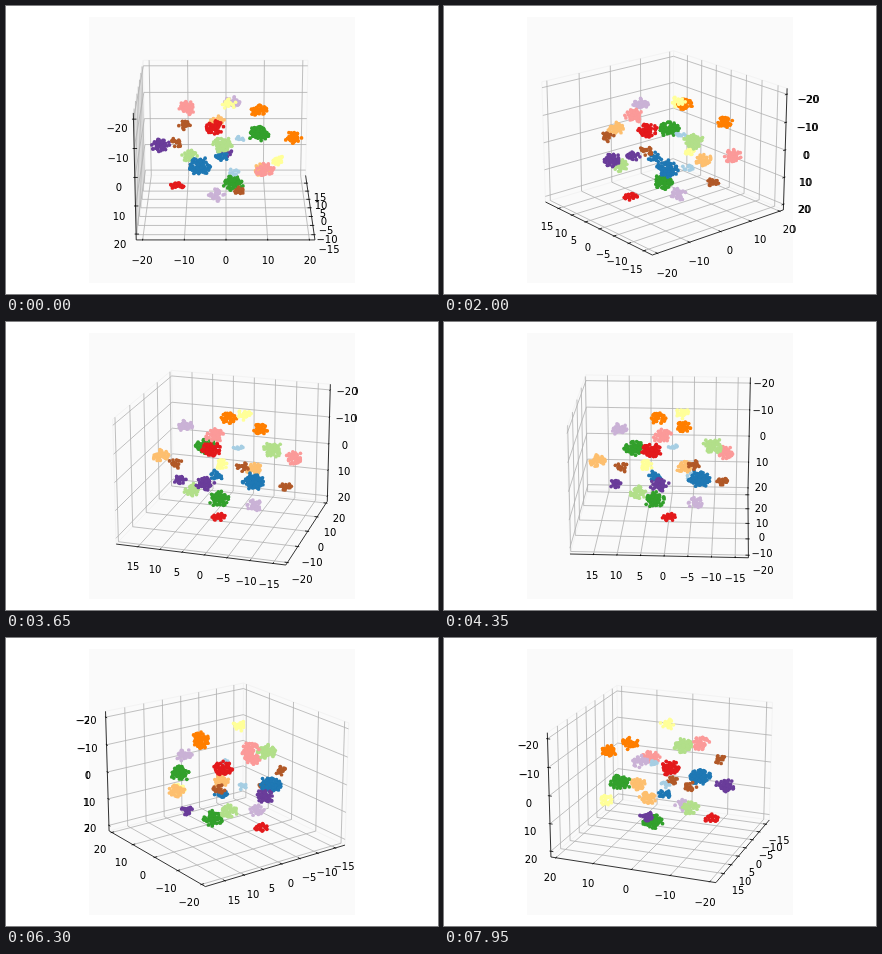
Write an HTML page with a canvas that moves like this. It is 432x288 px and loops after 8 s.

```html
<!DOCTYPE html>
<html lang="en">
<head>
<meta charset="utf-8">
<title>Rotating 3D scatter plot</title>
<style>
  html, body { margin: 0; width: 100%; height: 100%; overflow: hidden; background: #fff; }
  canvas { display: block; }
</style>
</head>
<body>
<canvas id="stage" width="432" height="288"></canvas>
<script>
const ctx = document.getElementById('stage').getContext('2d');

const STEP_MS = 50, STEPS = 160, START_AZIM = -90;
const RAD = Math.PI / 180, ELEV = 20 * RAD;
const CENTER = { x: 219.6, y: 140.4 };
const CAMERA = 1440;
const HALF = 85.72, HALF_Z = HALF * 0.75;   // half sizes of the box
const PAD = 14.2, PAD_Z = PAD * 0.75;       // label distance from the box
const TICK_OUT = 1.4, TICK_IN = 2.8;
const PANEL = [83, 11, 266, 266];

const toX = v => 4 * v + 0.4;
const toY = v => 4.54 * v - 5;
const toZ = v => -2.909 * v;

const ticks = (limit, step) =>
  Array.from({ length: 2 * limit / step + 1 }, (_, i) => i * step - limit);
const TENS = ticks(20, 10), FIVES = ticks(15, 5);

// Colour, points per cluster, then the cluster centres
const CLUSTERS = [
  ['#a6cee3', 10, [15, -9, 11], [8, -28, -16]],
  ['#1f78b4', 105, [-25, -37, -7]],
  ['#1f78b4', 24, [-4, 8, -13]],
  ['#b2df8a', 80, [-3, -49, 20]],
  ['#b2df8a', 42, [-37, 23, -18]],
  ['#33a02c', 85, [34, 32, 2], [8, 10, -43]],
  ['#fb9a99', 55, [-39, -1, 41], [37, -61, -1]],
  ['#e31a1c', 70, [-11, 11, 16]],
  ['#e31a1c', 24, [-49, -7, -39]],
  ['#fdbf6f', 46, [-9, 66, 4], [36, -20, -18]],
  ['#ff7f00', 43, [67, -17, 15], [33, 7, 35]],
  ['#cab2d6', 38, [7, 45, 32], [-9, -33, -39]],
  ['#6a3d9a', 60, [-65, 0, 1]],
  ['#6a3d9a', 26, [0, 48, -23]],
  ['#ffff99', 24, [3, -19, 51], [54, 21, -23]],
  ['#b15928', 20, [12, -60, -25], [-42, 38, 10], [-48, -32, 16]]
];

function seededRandom(seed) {
  return () => {
    seed = (seed + 0x6D2B79F5) | 0;
    let t = Math.imul(seed ^ (seed >>> 15), 1 | seed);
    t = (t + Math.imul(t ^ (t >>> 7), 61 | t)) ^ t;
    return ((t ^ (t >>> 14)) >>> 0) / 4294967296;
  };
}

// A flattened ball of points that is denser in the middle
function scatter([x, y, z], count, random) {
  const radius = 3.5 + 0.8 * Math.sqrt(count);
  return Array.from({ length: count }, () => {
    const r = radius * Math.sqrt(random());
    const turn = 2 * Math.PI * random();
    const up = 2 * random() - 1;
    const flat = r * Math.sqrt(1 - up * up);
    return [x + flat * Math.cos(turn), y + flat * Math.sin(turn), z + 0.7 * r * up];
  });
}

const random = seededRandom(11);
const points = CLUSTERS.flatMap(([color, count, ...centers]) =>
  centers.flatMap(c => scatter(c, count, random).map(pos => ({ color, pos }))));

function makeProjector(azim) {
  const cos = Math.cos(azim), sin = Math.sin(azim);
  const ce = Math.cos(ELEV), se = Math.sin(ELEV);
  return ([x, y, z]) => {
    const near = x * cos + y * sin;
    const depth = near * ce + z * se;
    const k = CAMERA / (CAMERA - depth);
    return {
      x: CENTER.x + (y * cos - x * sin) * k,
      y: CENTER.y - (z * ce - near * se) * k,
      depth
    };
  };
}

function draw(step) {
  const project = makeProjector((START_AZIM - step) * RAD);

  const pen = (color, width) => (...path) => {
    ctx.strokeStyle = color;
    ctx.lineWidth = width;
    ctx.beginPath();
    for (const p of path) {
      const q = project(p);
      ctx.lineTo(q.x, q.y);
    }
    ctx.stroke();
  };
  const edge = pen('#f3f3f3', 1);
  const grid = pen('#b0b0b0', 0.8);
  const axis = pen('#000', 0.8);

  const labels = [];
  const label = (value, pos) => {
    const q = project(pos);
    labels.push([String(value).replace('-', '\u2212'), Math.round(q.x), Math.round(q.y) + 8]);
  };

  ctx.fillStyle = '#fff';
  ctx.fillRect(0, 0, 432, 288);
  ctx.fillStyle = '#fafafa';
  ctx.fillRect(...PANEL);

  // Sides of the box that face away from the camera
  const sx = step === 0 ? -1 : 1;
  const sy = step <= 90 ? 1 : -1;
  const farX = sx * HALF, nearX = -farX;
  const farY = sy * HALF, nearY = -farY;
  const low = -HALF_Z, high = HALF_Z;

  for (const z of [low, high]) edge([nearX, farY, z], [farX, farY, z], [farX, nearY, z]);
  for (const [x, y] of [[nearX, farY], [farX, farY], [farX, nearY]]) edge([x, y, low], [x, y, high]);

  for (const v of TENS) {
    const x = toX(v), z = toZ(v);
    grid([x, nearY, low], [x, farY, low], [x, farY, high]);
    grid([nearX, farY, z], [farX, farY, z], [farX, nearY, z]);
  }
  for (const v of FIVES) {
    const y = toY(v);
    grid([nearX, y, low], [farX, y, low], [farX, y, high]);
  }

  axis([-HALF, nearY, low], [HALF, nearY, low]);
  axis([nearX, -HALF, low], [nearX, HALF, low]);
  axis([farX, nearY, low], [farX, nearY, high]);

  for (const v of TENS) {
    const x = toX(v), z = toZ(v);
    axis([x, nearY - sy * TICK_OUT, low], [x, nearY + sy * TICK_IN, low]);
    axis([farX + sx * TICK_OUT, nearY, z], [farX - sx * TICK_IN, nearY, z]);
    label(v, [x, nearY - sy * PAD, low - PAD_Z]);
    label(v, [farX + sx * PAD, nearY - sy * PAD, z]);
  }
  for (const v of FIVES) {
    const y = toY(v);
    axis([nearX - sx * TICK_OUT, y, low], [nearX + sx * TICK_IN, y, low]);
    label(v, [nearX - sx * PAD, y, low - PAD_Z]);
  }

  drawLabels(labels);

  const dots = points.map(p => ({ color: p.color, ...project(p.pos) }));
  dots.sort((a, b) => a.depth - b.depth);
  for (const d of dots) {
    ctx.fillStyle = d.color;
    ctx.beginPath();
    ctx.arc(d.x, d.y, 1.85, 0, 2 * Math.PI);
    ctx.fill();
  }
}

function drawLabels(labels) {
  ctx.fillStyle = '#000';
  ctx.font = '10px "DejaVu Sans", sans-serif';
  ctx.textAlign = 'center';
  ctx.textBaseline = 'alphabetic';
  const write = shift => labels.forEach(([text, x, y]) => ctx.fillText(text, x + shift, y));
  write(0);
  // Text beyond the panel is printed twice and looks heavier
  ctx.save();
  ctx.beginPath();
  ctx.rect(0, 0, 432, 288);
  ctx.rect(...PANEL);
  ctx.clip('evenodd');
  write(1);
  ctx.restore();
}

function tick() {
  draw(Math.floor(performance.now() / STEP_MS) % STEPS);
  requestAnimationFrame(tick);
}
tick();
</script>
</body>
</html>
```
